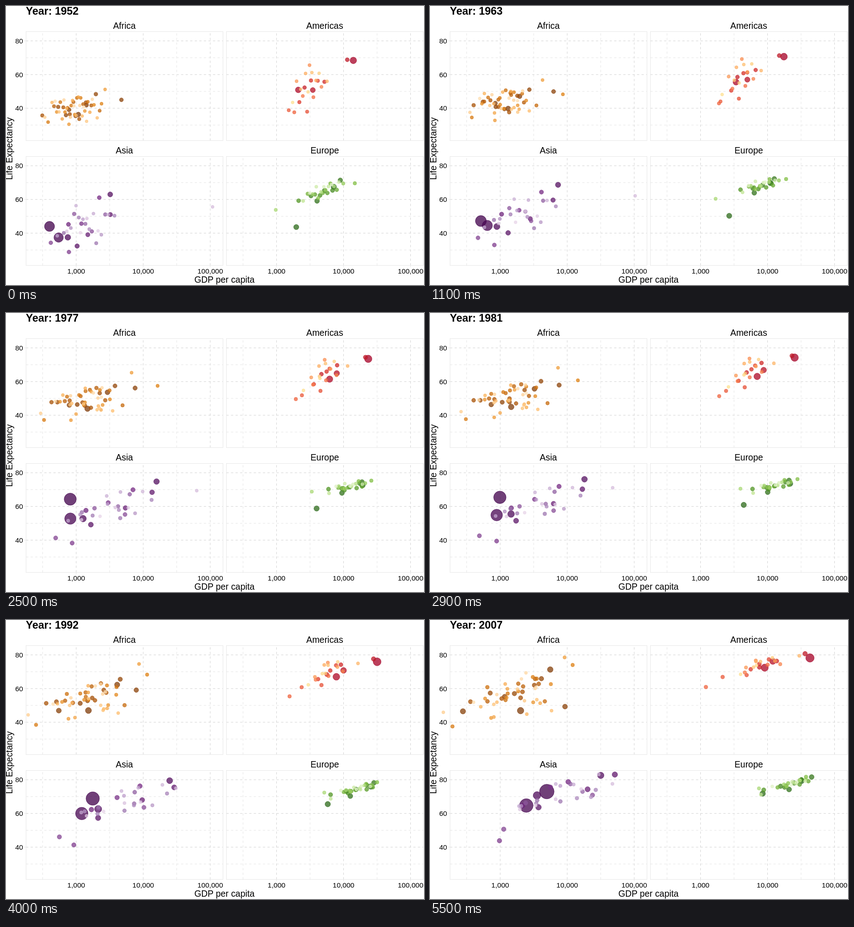
An HTML page for the animation above (5.6 s loop, 917x611 px).

```html
<!DOCTYPE html>
<html lang="en">
<head>
<meta charset="utf-8">
<title>Life expectancy and GDP</title>
<style>
html, body { margin: 0; width: 100%; height: 100%; overflow: hidden; background: #fff; }
svg { display: block; width: 100%; height: 100%; font-family: "Liberation Sans", Arial, sans-serif; }
</style>
</head>
<body>
<svg id="stage" viewBox="0 0 917 611"></svg>
<script>
const FIRST = 1952, STEPS = 56, STEP_MS = 100;
const MAJOR = '#d0d0d0', MINOR = '#e4e4e4', EDGE = '#e6e6e6';
const stage = document.getElementById('stage');
const dots = [];

const px = logGdp => 154 + 147 * (logGdp - 3);
const py = life => 76.4 + (80 - life) * 3.688;
const radius = pop => 3.04 + 13 * Math.sqrt(pop / 1319);
const mix = (a, b, t) => a + (b - a) * t;

// Linear path through evenly spaced values.
function along(list, t, blend) {
  const s = t * (list.length - 1);
  const i = Math.min(list.length - 2, Math.floor(s));
  return blend(list[i], list[i + 1], s - i);
}

const mixAll = (a, b, t) => a.map((v, k) => mix(v, b[k], t));

let seed = 7;
function random() {
  seed = (seed * 16807) % 2147483647;
  return seed / 2147483647;
}
const bell = () => 2 * (random() + random() + random() - 1.5);

function add(tag, attrs, text) {
  const el = document.createElementNS('http://www.w3.org/2000/svg', tag);
  for (const k in attrs) el.setAttribute(k, attrs[k]);
  if (text) el.textContent = text;
  return stage.appendChild(el);
}

function label(text, x, y, size, anchor = 'middle', more = {}) {
  return add('text', { x, y, 'font-size': size, 'text-anchor': anchor, ...more }, text);
}

function line(x1, y1, x2, y2, stroke, dash = 'none') {
  add('line', { x1, y1, x2, y2, stroke, 'stroke-dasharray': dash });
}

function frame(name, dx, dy) {
  const left = 44 + dx, top = 56 + dy, right = left + 432, bottom = top + 238.7;
  for (let i = 0; i < 6; i++) {
    const color = i % 2 ? MAJOR : MINOR;
    const x = 80.5 + 73.5 * i + dx, y = py(30 + 10 * i) + dy;
    line(x, bottom, x, top, color, '5 5');
    line(left, y, right, y, color, '5 5');
    if (i % 2 && !dx) {
      line(40, y, left, y, EDGE);
      label(30 + 10 * i, 37.5, y + 5.5, 15.5, 'end');
    }
    if (i % 2 && dy) {
      line(x, bottom, x, bottom + 4, EDGE);
      label((10 ** (3 + (i - 1) / 2)).toLocaleString('en-US'), x, 586, 15.5);
    }
  }
  add('rect', { x: left, y: top, width: 432, height: 238.7, fill: 'none', stroke: EDGE });
  label(name, left + 215.7, top - 6.5, 19.4);
}

function rampColor(ramp, t) {
  const rgb = ramp.map(hex => [1, 3, 5].map(k => parseInt(hex.substr(k, 2), 16)));
  return `rgb(${along(rgb, t, mixAll).map(Math.round)})`;
}

// A landmark: population in millions, then pairs of GDP and life expectancy at even intervals.
function mark(pop, ...values) {
  const path = [];
  for (let i = 0; i < values.length; i += 2) path.push([Math.log10(values[i]), values[i + 1]]);
  return { pop, path };
}

// One dot of the cloud: its offset from the trend wanders a little with each stage.
// trend rows: mean log GDP, its spread, mean life, slope per decade of GDP, scatter.
function wander(i, trend) {
  const p = mix(.04, .96, (i * .618034 + .3) % 1);
  let u = Math.log(p / (1 - p)) / 1.7, v = bell();
  return trend.map(([gdp, spread, life, slope, scatter]) => {
    const point = [gdp + spread * u, life + slope * spread * u + scatter * v];
    u += .2 * bell();
    v = .9 * v + .4 * bell();
    return point;
  });
}

// Dots run from the largest population to the smallest; colour follows that rank.
function panel({ name, dx, dy, ramp, count, top, decay, past, trend, marks }) {
  frame(name, dx, dy);
  const cloud = Array.from({ length: count - marks.length }, (_, i) => ({
    pop: top * Math.exp(-decay * (i + marks.length) / (count - 1)),
    path: wander(i, trend)
  }));
  const all = [...marks, ...cloud].sort((a, b) => b.pop - a.pop);
  all.forEach(({ pop, path }, i) => {
    const color = rampColor(ramp, i / (count - 1));
    const el = add('circle', {
      fill: color, stroke: color, 'fill-opacity': .75, 'stroke-opacity': .75, 'stroke-width': .9
    });
    dots.push({ el, dx, dy, path, r0: radius(pop * past), r1: radius(pop) });
  });
}

panel({
  name: 'Africa', dx: 0, dy: 0, count: 52, top: 55, decay: 4.5, past: .28,
  ramp: ['#7f3b08', '#b35806', '#e08214', '#fdb863', '#fee0b6'],
  trend: [[2.97, .27, 39, 4, 4.5], [3.14, .32, 46, 5, 4.7], [3.18, .38, 53, 9, 5.5], [3.2, .4, 55, 9, 7]],
  marks: [
    mark(135, 1077, 36.3, 1500, 42.1, 1430, 47, 2014, 46.9),
    mark(80, 1419, 41.9, 3150, 54.8, 5581, 71.3),
    mark(65, 781, 39.1, 890, 45.5, 640, 47, 278, 46.5),
    mark(44, 4725, 45, 7550, 53.2, 7600, 61.3, 9270, 49.3),
    mark(6, 2388, 42.7, 20300, 52, 11300, 67, 12057, 74)
  ]
});

panel({
  name: 'Americas', dx: 439.5, dy: 0, count: 25, top: 50, decay: 3.8, past: .45,
  ramp: ['#a50026', '#d73027', '#f46d43', '#fdae61', '#fee090'],
  trend: [[3.5, .18, 53, 15, 6], [3.7, .18, 61.5, 15, 4.5], [3.75, .2, 68.5, 15, 3.2], [3.9, .26, 73.5, 7, 2.5]],
  marks: [
    mark(301, 13990, 68.4, 24600, 74, 42952, 78.2),
    mark(190, 2109, 50.9, 6900, 62.5, 9066, 72.4),
    mark(109, 3478, 50.8, 8600, 66.3, 11978, 76.2),
    mark(33, 11367, 68.8, 22600, 75, 36319, 80.7),
    mark(8.5, 1840, 37.6, 1950, 50.8, 1202, 60.9)
  ]
});

panel({
  name: 'Asia', dx: 0, dy: 273.5, count: 33, top: 200, decay: 5, past: .38,
  ramp: ['#40004b', '#762a83', '#9970ab', '#c2a5cf', '#e7d4e8'],
  trend: [[3.15, .3, 47, 10, 7], [3.45, .42, 56.5, 9, 6], [3.65, .47, 65, 10, 4.5], [3.87, .48, 71, 12, 4]],
  marks: [
    mark(1319, 400, 44, 515, 47.2, 705, 63.5, 1200, 66.5, 2200, 70.2, 4959, 73),
    mark(1110, 547, 37.4, 715, 49.3, 1035, 58.9, 2452, 64.7),
    mark(224, 750, 37.5, 1000, 48.2, 1900, 60.8, 3541, 70.7),
    mark(127, 3217, 63, 12600, 72.5, 23500, 78.8, 31656, 82.6),
    mark(32, 779, 28.8, 880, 39.2, 975, 43.8),
    mark(2.5, 108382, 55.6, 100000, 66.5, 28000, 74.4, 47307, 77.6)
  ]
});

panel({
  name: 'Europe', dx: 439.5, dy: 273.5, count: 30, top: 90, decay: 4.3, past: .78,
  ramp: ['#276419', '#4d9221', '#7fbc41', '#b8e186', '#e6f5d0'],
  trend: [[3.7, .21, 65.5, 16, 2.2], [4.04, .17, 71, 6, 1.4], [4.15, .23, 73.8, 9, 1.3], [4.35, .23, 77.7, 10, 1.1]],
  marks: [
    mark(82, 7144, 67.5, 21200, 73.2, 32170, 79.4),
    mark(71, 1969, 43.6, 4250, 60.3, 8458, 71.8),
    mark(7.6, 14734, 69.6, 27500, 75.9, 37506, 81.7),
    mark(4.6, 974, 53.8, 3800, 70.3, 7446, 74.9)
  ]
});

label('GDP per capita', 479.3, 606, 19.4);
label('Life Expectancy', 0, 0, 19.4, 'middle', { transform: 'translate(14 312.3) rotate(-90)' });
const title = label('Year:', 43.5, 19, 23.4, 'start', { 'font-weight': 'bold' });

function draw(step) {
  const t = step / (STEPS - 1);
  title.textContent = 'Year: ' + (FIRST + step);
  for (const { el, dx, dy, path, r0, r1 } of dots) {
    const [gdp, life] = along(path, t, mixAll);
    el.setAttribute('cx', (px(gdp) + dx).toFixed(2));
    el.setAttribute('cy', (py(life) + dy).toFixed(2));
    el.setAttribute('r', mix(r0, r1, t).toFixed(2));
  }
}

const start = performance.now();
let shown = -1;
function tick() {
  const step = Math.floor((performance.now() - start) / STEP_MS) % STEPS;
  if (step !== shown) draw(shown = step);
  requestAnimationFrame(tick);
}
tick();
</script>
</body>
</html>
```
